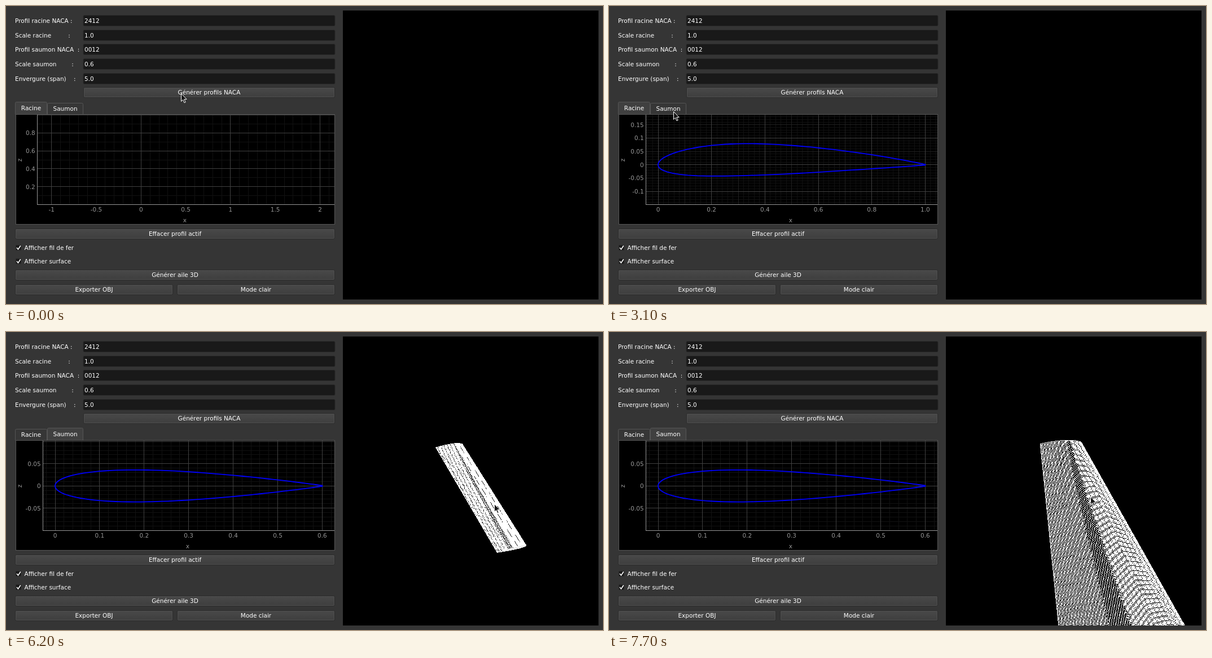
Animation of 1058 by 529 pixels, one loop 8 s. Source, as an HTML page:

```html
<!DOCTYPE html>
<html lang="fr">
<head>
<meta charset="utf-8">
<style>
html, body { margin: 0; width: 100%; height: 100%; overflow: hidden; background: #353535; }
svg { display: block; width: 1058px; height: 529px; font: 10.5px "DejaVu Sans", Verdana, sans-serif; }
</style>
</head>
<body>
<svg id="stage" viewBox="0 0 1058 529">
  <defs>
    <linearGradient id="raised" x2="0" y2="1">
      <stop stop-color="#494949"/><stop offset="1" stop-color="#3e3e3e"/>
    </linearGradient>
    <clipPath id="viewClip"><rect x="597" y="8" width="453" height="513"/></clipPath>
    <clipPath id="plotClip"><rect x="18" y="193" width="564" height="194"/></clipPath>
  </defs>
</svg>
<script>
const LOOP = 8000, STEP = 100;
const stage = document.getElementById('stage');
const mix = (a, b, k) => a + (b - a) * k;
const clamp = v => Math.max(0, Math.min(1, v));

function add(parent, tag, attrs = {}, text) {
  const el = document.createElementNS('http://www.w3.org/2000/svg', tag);
  for (const key in attrs) el.setAttribute(key, attrs[key]);
  if (text !== undefined) el.textContent = text;
  parent.append(el);
  return el;
}
const box = (parent, x, y, width, height, fill, more) =>
  add(parent, 'rect', { x, y, width, height, fill, ...more });
const label = (parent, text, x, y, anchor = 'start', fill = '#fff') =>
  add(parent, 'text', { x, y, fill, 'text-anchor': anchor }, text);
const line = (parent, x1, y1, x2, y2, stroke) =>
  add(parent, 'path', { d: `M${x1} ${y1}L${x2} ${y2}`, stroke, fill: 'none' });
const toPath = points => 'M' + points.map(([x, y]) => x.toFixed(1) + ' ' + y.toFixed(1)).join('L');

// ---- Form ----
function button(text, x, y, width) {
  box(stage, x + .5, y + .5, width - 1, 18, 'url(#raised)', { rx: 2, stroke: '#2a2a2a' });
  box(stage, x + 1.5, y + 1.5, width - 3, 16, 'none', { rx: 1, stroke: '#505050' });
  label(stage, text, x + width / 2, y + 13.2, 'middle');
}

function checkbox(text, y) {
  box(stage, 17.5, y - 4.5, 9, 9, '#191919', { stroke: '#2a2a2a', rx: 1 });
  add(stage, 'path', { d: `M19 ${y}l2.5 3 4.3-6.5`, stroke: '#fff', 'stroke-width': 1.6, fill: 'none' });
  label(stage, text, 32.5, y + 4);
}

[
  ['Profil racine NACA', 1, '2412'],
  ['Scale racine', 9, '1.0'],
  ['Profil saumon NACA', 2, '0012'],
  ['Scale saumon', 8, '0.6'],
  ['Envergure (span)', 4, '5.0']
].forEach(([name, spaces, value], i) => {
  const y = 26.2 + i * 25.6;
  label(stage, name + '\u00a0'.repeat(spaces) + ':', 16, y + 4);
  box(stage, 137, Math.round(y - 10) + .5, 446, 19, '#191919', { rx: 2, stroke: '#2b2b2b' });
  label(stage, value, 139, y + 4);
});
button('Générer profils NACA', 137, 144, 446);
button('Effacer profil actif', 16, 395, 567);
checkbox('Afficher fil de fer', 429);
checkbox('Afficher surface', 453);
button('Générer aile 3D', 16, 468, 567);
button('Exporter OBJ', 16, 494, 280);
button('Mode clair', 303, 494, 280);
box(stage, 597, 8, 453, 513, '#000');

// ---- NACA four-digit sections, 12 % thick ----
function section(camber, x, side) {
  const p = .4;
  const half = .6 * (.2969 * Math.sqrt(x) - .126 * x - .3516 * x ** 2 + .2843 * x ** 3 - .1015 * x ** 4);
  const mean = x < p ? camber / p ** 2 * (2 * p * x - x * x)
    : camber / (1 - p) ** 2 * (1 - 2 * p + 2 * p * x - x * x);
  return mean + side * half;
}

// Runs from the trailing edge over the top and back underneath.
function outline(camber, scale) {
  return Array.from({ length: 121 }, (_, i) => {
    const angle = Math.PI * i / 60;
    const x = (1 + Math.cos(angle)) / 2;
    return [x * scale, section(camber, x, i < 60 ? 1 : -1) * scale];
  });
}

// ---- Profile plots ----
const plots = {
  empty: { axis: 55.5, x0: 239.3, y0: 352.3, unit: 158.6, xSteps: [.1, 1], ySteps: [.1, .2], xLabel: .5, yLabel: .2, tab: 0 },
  root: { axis: 65.5, x0: 87, y0: 281.8, unit: 473.4, xSteps: [.02, .1, .2], ySteps: [.01, .05, .1], xLabel: .2, yLabel: .05, tab: 0, curve: outline(.02, 1) },
  tip: { axis: 65.5, x0: 87, y0: 273.2, unit: 789, xSteps: [.02, .1], ySteps: [.01, .05], xLabel: .1, yLabel: .05, tab: 1, curve: outline(0, .6) }
};
const plotLayer = add(stage, 'g');

function ticks(lo, hi, step, visit) {
  for (let i = Math.ceil(lo / step); i * step <= hi; i++) visit(i * step);
}
const shade = (i, count) => i === count - 1 ? '#404040' : i ? '#202020' : '#111';

function drawTab(name, x, width, selected) {
  const y = selected ? 170.5 : 172.5;
  add(plotLayer, 'path', {
    d: `M${x}.5 192.5V${y + 2}q0-2 2-2h${width - 4}q2 0 2 2V192.5`,
    fill: selected ? '#404040' : '#363636', stroke: '#555'
  });
  label(plotLayer, name, x + width / 2 + .5, selected ? 185.2 : 186.2, 'middle');
}

function drawPlot(plot) {
  const { axis, x0, y0, unit, xSteps, ySteps } = plot;
  const px = v => x0 + v * unit, py = v => y0 - v * unit;
  const snap = v => Math.floor(v) + .5;
  const left = (axis - x0) / unit, right = (582 - x0) / unit;
  const bottom = (y0 - 352.5) / unit, top = (y0 - 193) / unit;
  const name = v => String(+v.toFixed(2));
  plotLayer.replaceChildren();
  drawTab('Racine', 16, 56, plot.tab === 0);
  drawTab('Saumon', 73, 63, plot.tab === 1);
  box(plotLayer, 17.5, 192.5, 565, 195, '#000', { stroke: '#555' });
  const inner = add(plotLayer, 'g', { 'clip-path': 'url(#plotClip)' });
  for (let i = 0; i < 3; i++) {
    if (xSteps[i]) ticks(left, right, xSteps[i], v => line(inner, snap(px(v)), 193, snap(px(v)), 352, shade(i, xSteps.length)));
    if (ySteps[i]) ticks(bottom, top, ySteps[i], v => line(inner, axis, snap(py(v)), 582, snap(py(v)), shade(i, ySteps.length)));
  }
  line(inner, axis, 193, axis, 353, '#969696');
  line(inner, axis, 352.5, 582, 352.5, '#969696');
  ticks(left, right, plot.xLabel, v => {
    const text = plot === plots.root && v > .99 ? '1.0' : name(v);
    label(inner, text, px(v), 365, 'middle', '#969696');
  });
  ticks(bottom, top, plot.yLabel, v => {
    if (py(v) > 200 && py(v) < 345) label(inner, name(v), axis - 3.8, py(v) + 4, 'end', '#969696');
  });
  label(inner, 'x', (axis + 578) / 2, 384, 'middle', '#969696');
  add(inner, 'text', { transform: 'translate(28 273.5) rotate(-90)', 'text-anchor': 'middle', fill: '#969696' }, 'z');
  if (plot.curve) add(inner, 'path', {
    d: toPath(plot.curve.map(([x, y]) => [px(x), py(y)])) + 'Z',
    fill: 'none', stroke: '#00f', 'stroke-width': 1.8
  });
}

// ---- Wing seen by an orbiting camera ----
const WING_START = 4700, SPAN = 5, TAPER = .6;
const FOCAL = 226.5 / Math.tan(Math.PI / 6);
const drags = [
  { from: 5200, to: 5800, azimuth: 16, elevation: 1, clicks: 0 },
  { from: 5900, to: 6200, azimuth: 13, elevation: 2, clicks: 4 },
  { from: 6300, to: 6600, azimuth: 1, elevation: -1, clicks: 3 },
  { from: 7100, to: 7300, azimuth: 8, elevation: -7, clicks: 0 },
  { from: 7400, to: 7700, azimuth: 2.4, elevation: -3.7, clicks: 3 }
];

function cameraAt(t) {
  const turned = key => drags.reduce((sum, d) => sum + d[key] * clamp((t - d.from) / (d.to - d.from)), 0);
  const az = (45 + turned('azimuth')) * Math.PI / 180;
  const el = (30 + turned('elevation')) * Math.PI / 180;
  const distance = 10 * .887 ** turned('clicks');
  const depth = (x, y, z) => distance - (x * Math.cos(az) + y * Math.sin(az)) * Math.cos(el) - z * Math.sin(el);
  const project = (x, y, z) => {
    const scale = FOCAL / depth(x, y, z);
    const toward = x * Math.cos(az) + y * Math.sin(az);
    return [
      823.5 + scale * (y * Math.cos(az) - x * Math.sin(az)),
      264.5 - scale * (z * Math.cos(el) - toward * Math.sin(el))
    ];
  };
  return { depth, project };
}

const wing = add(stage, 'g', { 'clip-path': 'url(#viewClip)', 'shape-rendering': 'crispEdges' });
const skin = add(wing, 'path', { fill: '#141414' });
// Chordwise zones: nose, dark band, tail
const zones = [
  { width: 1.5, dash: 7, gap: 1 },
  { width: 1.1, dash: 2, gap: 2.2 },
  { width: 1.2, dash: 5, gap: 1.1 }
].map(zone => ({ ...zone, path: add(wing, 'path', { stroke: '#fff', fill: 'none', 'stroke-width': zone.width }) }));
const rim = add(wing, 'path', { stroke: '#fff', fill: 'none' });
const cap = add(wing, 'path', { fill: '#ececec' });

function drawWing(t) {
  wing.setAttribute('display', t < WING_START ? 'none' : 'inline');
  if (t < WING_START) return;
  const { depth, project } = cameraAt(t);
  const point = (chord, v, side = 1) => {
    const z = mix(section(.02, chord, side), TAPER * section(0, chord, side), v);
    return project(chord * mix(1, TAPER, v) - .4, (v - .5) * SPAN, z);
  };
  const rib = (v, from, to, count = 4, side = 1) =>
    Array.from({ length: count + 1 }, (_, i) => point(mix(from, to, (i / count) ** 2), v, side));

  const edge = toPath([...rib(0, 0, 1, 16), ...rib(1, 0, 1, 16).reverse()]) + 'Z';
  skin.setAttribute('d', edge);
  rim.setAttribute('d', edge);
  cap.setAttribute('d', toPath([...rib(1, 0, 1, 16), ...rib(1, 0, 1, 16, -1).reverse()]) + 'Z');

  // Ribs are spaced evenly on screen and close up as the wing is foreshortened.
  const height = point(1, 1)[1] - point(1, 0)[1];
  const pitch = Math.min(1.9, height / 170);
  const count = Math.round(height / pitch);
  const far = depth(0, -SPAN / 2, 0), near = depth(0, SPAN / 2, 0);
  const data = ['', '', ''];
  for (let k = 1; k < count; k++) {
    const q = k / count;
    const v = q / near / ((1 - q) / far + q / near);
    const jitter = k * .618 % 1 * .04;
    const centre = mix(.32, .55, v), half = mix(.06, .11, v);
    const stops = [jitter / 2, centre - half + jitter, centre + half - jitter, 1];
    data.forEach((_, i) => data[i] += toPath(rib(v, stops[i], stops[i + 1])));
  }
  const openness = clamp(pitch - .45);
  zones.forEach(({ path, dash, gap }, i) => {
    path.setAttribute('d', data[i]);
    path.setAttribute('stroke-dasharray', `${dash} ${gap * openness}`);
  });
}

// ---- Pointer ----
const glides = [
  [100, 600, 314, 51], [600, 1100, 282, 151], [1200, 1400, 287, 148], [2000, 2700, 114, 187],
  [3300, 3700, 200, 270], [3700, 4200, 290, 511], [4200, 4600, 306, 477],
  [4700, 5200, 912, 326], [5200, 6200, 865, 305], [7100, 7700, 853, 292]
];
const cursor = add(stage, 'path', {
  d: 'M.5.5V14.3L3.6 11.4 6 16.8 8.2 15.8 5.9 10.6H10.2Z',
  fill: '#151515', stroke: '#fff'
});

function cursorAt(t) {
  return glides.reduce(([x, y], [from, to, nextX, nextY]) => {
    const k = clamp((t - from) / (to - from));
    const eased = k * k * (3 - 2 * k);
    return [mix(x, nextX, eased), mix(y, nextY, eased)];
  }, [310, 155]);
}

// ---- Playback ----
let shownPlot, shownTime;
function render(time) {
  const t = Math.floor(time % LOOP / STEP) * STEP;
  if (t === shownTime) return;
  shownTime = t;
  const plot = t < 2000 ? plots.empty : t < 3300 ? plots.root : plots.tip;
  if (plot !== shownPlot) drawPlot(shownPlot = plot);
  drawWing(t);
  cursor.setAttribute('transform', `translate(${cursorAt(t).map(Math.round)})`);
}

const start = performance.now();
function tick() {
  render(performance.now() - start);
  requestAnimationFrame(tick);
}
tick();
</script>
</body>
</html>
```
